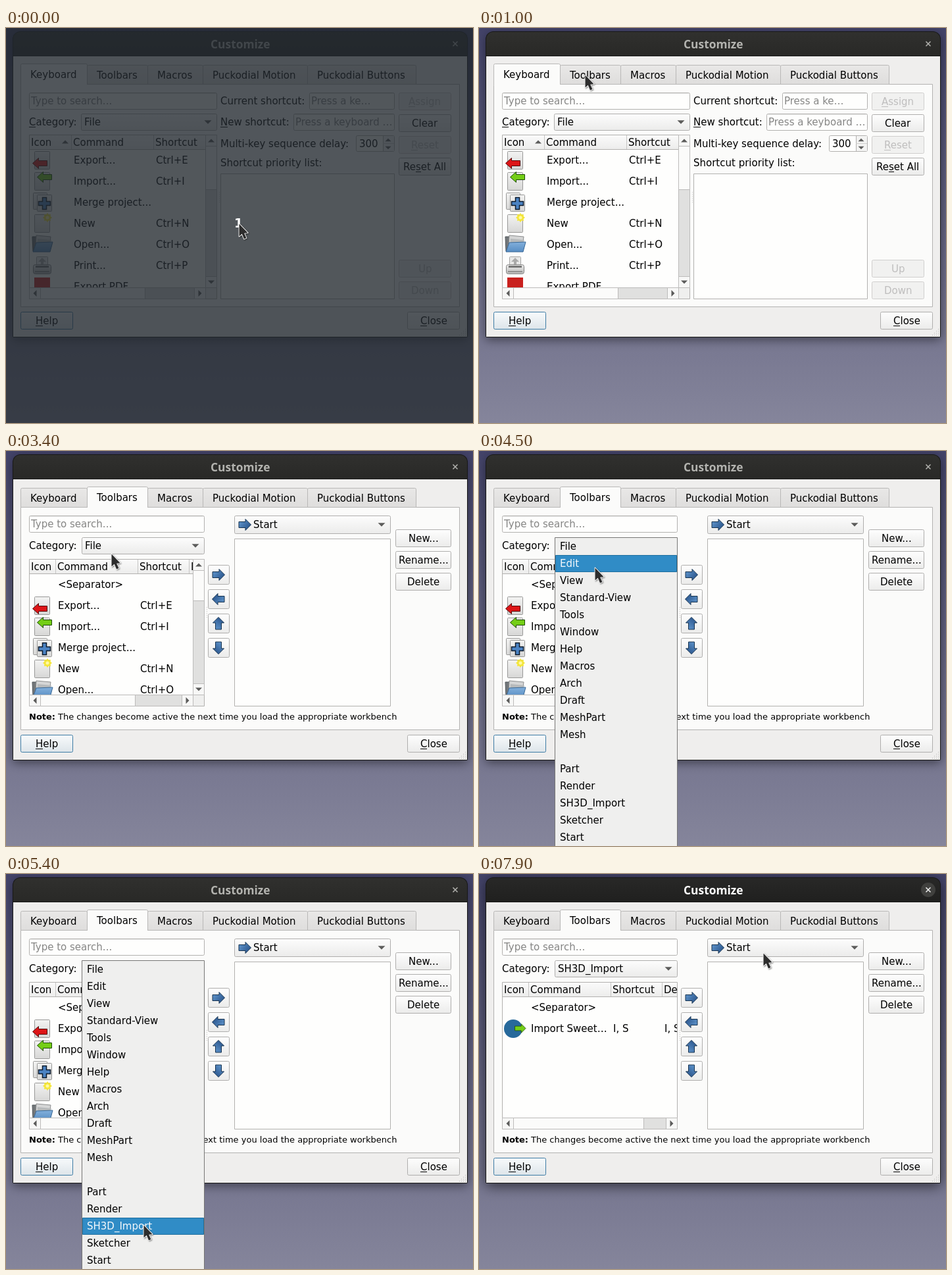
Recreate the animation shown at these times as an HTML page with a canvas. Size 710 by 600 pixels, loop 8 s.

```html
<!DOCTYPE html>
<html lang="en">
<head>
<meta charset="utf-8">
<title>Customize dialog</title>
<style>
html, body { margin: 0; width: 100%; height: 100%; overflow: hidden; }
canvas { display: block; width: 710px; height: 600px; }
</style>
</head>
<body>
<canvas id="stage" width="710" height="600"></canvas>
<script>
const g = document.getElementById('stage').getContext('2d');
const LOOP = 8000, STEP = 100;
const SANS = '"DejaVu Sans", Verdana, sans-serif';
const BODY = '15px ' + SANS;
const LINE = '#b2b1af', GREY = '#868685', OFF = '#bfbebe', PAPER = '#fefefd';

// time, tip x, tip y
const PATH = [
  [300, 354, 297], [400, 346, 291], [600, 285, 228], [800, 200, 125],
  [1000, 161, 71], [1200, 161, 71], [1300, 161, 68], [2800, 161, 68],
  [2900, 160, 76], [3100, 157, 122], [3300, 157, 166], [3400, 160, 156],
  [3700, 165, 144], [4200, 165, 144], [4300, 168, 152], [4500, 176, 177],
  [4700, 185, 268], [4900, 194, 405], [5100, 200, 523], [5400, 209, 533],
  [6800, 209, 533], [6900, 213, 520], [7100, 244, 445], [7300, 305, 320],
  [7500, 370, 205], [7700, 408, 147], [7800, 423, 129], [7900, 432, 120]
];

const FILE_ROWS = [
  ['Export...', 'Ctrl+E', exportIcon], ['Import...', 'Ctrl+I', importIcon],
  ['Merge project...', '', mergeIcon], ['New', 'Ctrl+N', newIcon],
  ['Open...', 'Ctrl+O', openIcon], ['Print...', 'Ctrl+P', printIcon],
  ['Export PDF...', '', pdfIcon]
];
const SEPARATOR = ['<Separator>', ''];
const MENU = ['File', 'Edit', 'View', 'Standard-View', 'Tools', 'Window', 'Help',
  'Macros', 'Arch', 'Draft', 'MeshPart', 'Mesh', '', 'Part', 'Render',
  'SH3D_Import', 'Sketcher', 'Start'];
const TABS = [['Keyboard', 22, 101], ['Toolbars', 123, 92], ['Macros', 215, 84],
  ['Puckodial Motion', 299, 159], ['Puckodial Buttons', 458, 165]];

function pointerAt(t) {
  const i = PATH.findIndex(p => p[0] > t);
  if (i === 0) return PATH[0].slice(1);
  if (i < 0) return PATH[PATH.length - 1].slice(1);
  const a = PATH[i - 1], b = PATH[i], k = (t - a[0]) / (b[0] - a[0]);
  return [1, 2].map(n => Math.round(a[n] + (b[n] - a[n]) * k));
}

function rect(x, y, w, h, fill) {
  g.fillStyle = fill;
  g.fillRect(x, y, w, h);
}

function box(x, y, w, h, fill, stroke = LINE, r = 0) {
  g.beginPath();
  g.roundRect(x + .5, y + .5, w - 1, h - 1, r);
  g.fillStyle = fill;
  g.fill();
  g.strokeStyle = stroke;
  g.lineWidth = 1;
  g.stroke();
}

function fade(y0, y1, a, b) {
  const f = g.createLinearGradient(0, y0, 0, y1);
  f.addColorStop(0, a);
  f.addColorStop(1, b);
  return f;
}

function poly(pts, fill, stroke, width = 1) {
  g.beginPath();
  pts.forEach(p => g.lineTo(p[0], p[1]));
  g.closePath();
  g.fillStyle = fill;
  g.fill();
  if (stroke) {
    g.strokeStyle = stroke;
    g.lineWidth = width;
    g.stroke();
  }
}

function clipped(x, y, w, h, draw) {
  g.save();
  g.beginPath();
  g.rect(x, y, w, h);
  g.clip();
  draw();
  g.restore();
}

// "&" underlines the letter that follows it
function text(s, x, y, color = '#000', font = BODY, centered = false) {
  const at = s.indexOf('&'), plain = s.replace('&', '');
  g.font = font;
  g.fillStyle = color;
  if (centered) x = Math.round(x - g.measureText(plain).width / 2);
  g.fillText(plain, x, y);
  if (at >= 0) {
    const left = x + g.measureText(plain.slice(0, at)).width;
    g.fillRect(Math.round(left), y + 2, Math.round(g.measureText(plain[at]).width), 1);
  }
}

function triangle(x, y, dir, size = 5, color = '#5c5c5b') {
  g.save();
  g.translate(x, y);
  g.rotate(dir * Math.PI / 2);
  poly([[-size, -size / 2], [size, -size / 2], [0, size / 2]], color);
  g.restore();
}

function button(s, x, y, w, state) {
  const off = state === 'off';
  const fill = off ? '#f1f1f0' : state === 'focus'
    ? fade(y, y + 27, '#f9fbfc', '#dce4e9') : fade(y, y + 27, '#fefefe', '#ebebea');
  box(x, y, w, 27, fill, off ? '#d0cfce' : state === 'focus' ? '#3e7ca5' : '#afaead', 2);
  text(s, x + w / 2, y + 19, off ? OFF : '#000', BODY, true);
}

function input(s, x, y, w) {
  box(x, y, w, 26, PAPER, LINE, 2);
  rect(x + 2, y + 1, w - 4, 1, '#e6e6e5');
  text(s, x + 3, y + 18, GREY);
}

function combo(s, x, y, w, h = 26, pad = 5) {
  box(x, y, w, h, fade(y, y + h, '#fdfdfd', '#ebebea'), '#afaead', 2);
  text(s, x + pad, y + h / 2 + 5, '#000');
  triangle(x + w - 14, y + h / 2, 0, 5.5);
}

function dots(x, y) {
  for (let i = 0; i < 18; i += 3) rect(x, y + i, 1, 1, '#c3c2c1');
}

function blueArrow(x, y, dir) {
  g.save();
  g.translate(x, y);
  g.rotate(dir * Math.PI / 2);
  const f = g.createLinearGradient(-9, -6, 9, 7);
  f.addColorStop(0, '#6096cd');
  f.addColorStop(1, '#254f86');
  poly([[-9, -4.5], [1, -4.5], [1, -8.5], [9.5, 0], [1, 8.5], [1, 4.5], [-9, 4.5]], f, '#16324f');
  g.restore();
}

function sideArrow(x, y, dir, fill, edge) {
  g.save();
  g.translate(x, y);
  g.scale(dir, 1);
  poly([[0, 0], [9, -8], [9, -4], [22, -4], [22, 4], [9, 4], [9, 8]], fill, edge);
  g.restore();
}

function sheet(x, y, w, h) {
  box(x, y, w, h, fade(y, y + h, '#f4f4f3', '#d6d6d5'), '#989897', 1);
}

function exportIcon(c) {
  sheet(43, c - 13, 24, 28);
  sideArrow(40.5, c + 5.5, -0 + 1, '#dd1517', '#540708');
}

function importIcon(c) {
  sheet(43, c - 13, 24, 28);
  sideArrow(47.5, c - 5.5, 1, '#74ce16', '#1d4a08');
}

function mergeIcon(c) {
  sheet(41, c - 14, 22, 26);
  sheet(47, c - 11, 23, 26);
  const arm = [[-3, -9], [3, -9], [3, -3], [9, -3], [9, 3], [3, 3]];
  const plus = arm.concat(arm.map(p => [-p[0], -p[1]]));
  poly(plus.map(p => [p[0] + 58.5, p[1] + c + 2.5]), '#4b83c3', '#0c1a2b', 1.5);
}

function newIcon(c) {
  sheet(43, c - 13, 24, 28);
  const star = Array.from({ length: 16 }, (_, i) => {
    const r = i % 2 ? 5 : 7, a = i * Math.PI / 8;
    return [63 + r * Math.cos(a), c - 8 + r * Math.sin(a)];
  });
  poly(star, '#f4e63a');
  g.beginPath();
  g.arc(63, c - 8, 2.5, 0, 7);
  g.fillStyle = '#fff9a5';
  g.fill();
}

function openIcon(c) {
  poly([[40, c - 11], [50, c - 11], [52, c - 8], [66, c - 8], [66, c + 10], [41, c + 11]], '#73777a', '#4d5357');
  poly([[46, c - 13], [68, c - 11], [66, c + 4], [45, c + 4]], '#d5d6d6', '#8b8d8e');
  poly([[48, c - 8], [69, c - 6], [66, c + 4], [47, c + 4]], '#b7babb');
  poly([[46, c - 2], [71, c - 3], [67, c + 12], [41, c + 12]], fade(c - 3, c + 12, '#83b0dc', '#578dc3'), '#386795');
}

function printIcon(c) {
  box(46, c - 13, 18, 18, '#e8e8e7', '#a5a5a4', 1);
  poly([[55, c - 11], [61, c - 5], [57, c - 5], [57, c + 1], [53, c + 1], [53, c - 5], [49, c - 5]], '#aaaaa9');
  box(41, c - 1, 28, 15, fade(c - 1, c + 14, '#eeeeed', '#b8b8b7'), '#858584', 3);
  rect(45, c + 1, 20, 3, '#777776');
  rect(44, c + 9, 22, 2, '#929291');
}

function pdfIcon(c) {
  rect(43, c - 13, 24, 28, '#c9211e');
}

function homeIcon(c) {
  g.beginPath();
  g.arc(52, c + 1, 14, 0, 7);
  g.fillStyle = '#27699b';
  g.fill();
  g.save();
  g.translate(71, c + .5);
  g.scale(.75, .85);
  sideArrow(0, 0, -1, '#74ce16', '#1d4a08');
  g.restore();
}

function scrollbar(x, y, len, thumb, vertical) {
  const part = (pos, size, fill) => vertical
    ? box(x, y + pos, 18, size, fill, '#bcbbba') : box(x + pos, y, size, 18, fill, '#bcbbba');
  part(0, len, '#e0e0df');
  part(0, 18, '#f7f7f6');
  part(len - 18, 18, '#f7f7f6');
  part(17, thumb, '#fbfbfa');
  if (vertical) {
    triangle(x + 9, y + 9, 2);
    triangle(x + 9, y + len - 9, 0);
  } else {
    triangle(x + 9, y + 9, 1);
    triangle(x + len - 9, y + 9, 3);
  }
}

function table(x, y, w, h, cols, rows, hThumb, vThumb) {
  box(x, y, w, h, PAPER);
  const inner = w - (vThumb ? 18 : 1), top = y + 23;
  clipped(x + 1, y + 1, inner - 1, h - 18, () => {
    rect(x, y + 1, w, 21, fade(y, top, '#fbfbfb', '#ececeb'));
    rect(x, y + 22, w, 1, LINE);
    cols.forEach(([name, left]) => {
      if (left > x + 1) rect(left - 1, y + 1, 1, 21, '#c6c5c4');
      text(name, left + 2, y + 17);
    });
    rows.forEach(([name, keys, icon, info], i) => {
      const c = top + 15 + i * 32;
      if (icon) icon(c);
      text(name, cols[1][1] + 3, c + 6);
      text(keys, cols[2][1] + 3, c + 6);
      if (info) text(info, cols[3][1] + 3, c + 6);
    });
  });
  if (vThumb) {
    rect(x + w - 18, y + h - 18, 17, 17, '#efefee');
    scrollbar(x + w - 18, y, h - 17, vThumb, true);
  }
  scrollbar(x, y + h - 18, w - (vThumb ? 17 : 0), hThumb, false);
}

function backdrop(active) {
  rect(0, 0, 710, 600, fade(0, 600, '#434369', '#85859b'));
  g.save();
  g.shadowColor = active ? 'rgba(0,0,0,.6)' : 'rgba(0,0,0,.45)';
  g.shadowBlur = active ? 20 : 15;
  g.shadowOffsetY = 4;
  g.beginPath();
  g.roundRect(10, 5, 692, 465, [12, 12, 2, 2]);
  g.fillStyle = '#181817';
  g.fill();
  g.restore();
}

function frame(active, tab) {
  backdrop(active);
  g.beginPath();
  g.roundRect(11, 6, 690, 36, [11, 11, 0, 0]);
  g.fillStyle = active ? fade(6, 42, '#282827', '#20201f') : fade(6, 42, '#30302e', '#292927');
  g.fill();
  text('Customize', 356, 31, active ? '#fff' : '#b3b3af', 'bold 17.4px "Noto Sans", "Open Sans", sans-serif', true);
  if (active) {
    g.beginPath();
    g.arc(683, 24, 11, 0, 7);
    g.fillStyle = '#40403e';
    g.fill();
  }
  g.strokeStyle = active ? '#f2f2f2' : '#b3b3af';
  g.lineWidth = 1.5;
  g.beginPath();
  for (const d of [-3.5, 3.5]) {
    g.moveTo(683 - d, 20.5);
    g.lineTo(683 + d, 27.5);
  }
  g.stroke();

  rect(11, 43, 690, 426, '#efeeed');
  box(22, 85, 668, 339, '#fbfbfa', '#b3b2b1');
  TABS.forEach(([name, x, w], i) => {
    const on = i === tab, y = on ? 54 : 56;
    box(x, y, w + 1, on ? 34 : 30, on ? '#fbfbfa' : fade(56, 86, '#e9e8e7', '#dedddc'), '#b9b8b7', [2, 2, 0, 0]);
    if (on) rect(x + (i ? 0 : 1), 86, w + 1, 3, '#fbfbfa');
    text(name, x + 15, on ? 76 : 77);
  });
  button('&Help', 22, 431, 80, 'focus');
  button('&Close', 610, 431, 80);
  for (let i = 0; i < 4; i++)
    for (let j = 0; j <= i; j++) rect(698 - j * 3, 457 + i * 3, 1, 1, '#b8b7b6');
}

function keyboardPage() {
  input('Type to search...', 35, 98, 286);
  text('&Category:', 35, 148);
  combo('File', 114, 130, 207);
  table(35, 162, 286, 250, [['Icon', 36], ['Command', 100], ['Shortcut', 225]], FILE_ROWS, 160, 67);
  triangle(90, 173, 2);
  dots(324, 249);

  text('Current shortcut:', 326, 116);
  input('Press a ke…', 461, 98, 130);
  text('&New shortcut:', 326, 148);
  input('Press a keyboard …', 437, 130, 154);
  text('Multi-key sequence delay:', 326, 181);
  box(532, 163, 59, 25, PAPER, LINE, 2);
  rect(573, 164, 17, 23, '#f3f3f2');
  rect(573, 164, 1, 23, LINE);
  rect(573, 175, 17, 1, '#cfcecd');
  triangle(581, 170, 2, 4.5);
  triangle(581, 182, 0, 4.5);
  text('300', 537, 181);
  text('Shortcut priority list:', 326, 210);
  box(326, 221, 265, 191, PAPER);
  button('&Assign', 597, 98, 80, 'off');
  button('Clear', 597, 131, 80);
  button('&Reset', 597, 164, 80, 'off');
  button('Re&set All', 597, 197, 80);
  button('Up', 597, 352, 80, 'off');
  button('Down', 597, 385, 80, 'off');
}

function toolbarsPage(t) {
  const cols = [['Icon', 36], ['Command', 76], ['Shortcut', 201], ['Description', 279]];
  input('Type to search...', 35, 98, 267);
  text('Category:', 35, 149);
  combo(t < 5700 ? 'File' : 'SH3D_Import', 115, 131, 187);
  if (t < 2100) table(35, 164, 267, 224, cols, [], 168);
  else if (t < 5800) table(35, 164, 267, 224, cols, [SEPARATOR, ...FILE_ROWS], 145, 47);
  else table(35, 164, 267, 224, cols, [SEPARATOR, ['Import Sweet…', 'I, S', homeIcon, 'I, S']], 199);
  dots(305, 237);

  [0, 2, 3, 1].forEach((dir, i) => {
    const y = 173 + i * 37;
    box(307, y, 33, 30, fade(y, y + 30, '#fefefe', '#ebebea'), '#afaead', 2);
    blueArrow(323, y + 15, dir);
  });
  combo('Start', 347, 98, 238, 28, 29);
  blueArrow(363, 112, 0);
  box(347, 133, 238, 255, PAPER);
  button('New...', 592, 119, 85);
  button('Rename...', 592, 152, 85);
  button('Delete', 592, 185, 85);
  text('Note:', 35, 408, '#000', 'bold 13px ' + SANS);
  text('The changes become active the next time you load the appropriate workbench', 79, 408, '#000', '13px ' + SANS);
}

function menu(tipY) {
  const current = Math.floor((tipY - 132) / 26);
  box(115, 131, 187, 480, '#efefee', '#777675');
  MENU.forEach((name, i) => {
    const y = 132 + i * 26;
    if (i === current) box(116, y, 185, 26, '#308cc6', '#1f6f9f');
    text(name, 123, y + 18, i === current ? '#f4f8fb' : '#000');
  });
}

function pointer(x, y) {
  g.save();
  g.translate(x, y);
  g.shadowColor = 'rgba(0,0,0,.35)';
  g.shadowBlur = 2;
  g.shadowOffsetX = g.shadowOffsetY = 1;
  g.lineJoin = 'round';
  const shape = [[.5, .5], [.5, 19.5], [4.7, 15.8], [8, 23.5], [11.5, 22], [8.2, 14.7], [13.7, 14.2]];
  poly(shape, '#fff', '#fff', 1.8);
  g.shadowColor = 'transparent';
  poly(shape, '#2d2d2d');
  g.restore();
}

function render(t) {
  const [x, y] = pointerAt(t);
  const tab = t < 2000 ? 0 : 1;
  frame(t >= 5700, tab);
  if (tab) toolbarsPage(t);
  else keyboardPage();
  if (t >= 3900 && t < 5700) menu(y);
  if (t < 100) {
    rect(0, 0, 710, 600, 'rgba(34,40,47,.78)');
    text('1', 354, 303, '#fff', 'bold 19px ' + SANS, true);
  }
  pointer(x, y);
}

let shown = -1;
function tick(now) {
  const t = Math.floor(now % LOOP / STEP) * STEP;
  if (t !== shown) render(shown = t);
  requestAnimationFrame(tick);
}
render(0);
requestAnimationFrame(tick);
</script>
</body>
</html>
```
